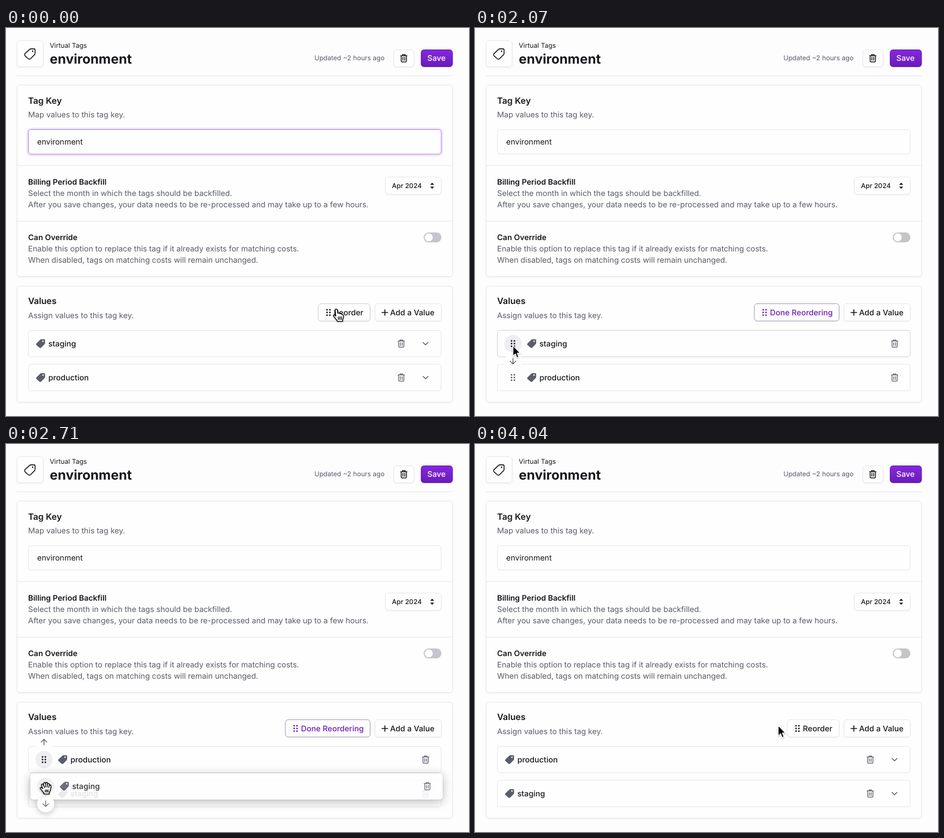
These frames come from a looping animation (817x686 px, 4080 ms). An HTML page:

```html
<!DOCTYPE html>
<html lang="en">
<head>
<meta charset="utf-8">
<title>Virtual Tags</title>
<style>
html, body { margin: 0; width: 100%; height: 100%; overflow: hidden; background: #fdfdfe; }
svg { display: block; width: 817px; height: 686px; font: 400 13.65px Inter, sans-serif; text-rendering: geometricPrecision; }
text { fill: #17171c; white-space: pre; }
.mute { fill: #585b68; }
.mid { font-weight: 500; font-size: 13.75px; }
.small { font-size: 11.7px; }
.bold { font-weight: 600; }
.h1 { font-size: 23.4px; font-weight: 700; }
.h2 { font-size: 15.4px; font-weight: 600; }
.box { fill: #fefefe; stroke: #e6e6ea; }
.card { filter: drop-shadow(0 1px 1px rgba(0,0,0,.06)); }
.rule { stroke: #e6e6ea; }
.line { fill: none; stroke-linecap: round; stroke-linejoin: round; }
.ink { stroke: #17171c; }
.gray { stroke: #5a5d6a; }
.lift { filter: drop-shadow(0 0 1px rgba(0,0,0,.28)) drop-shadow(0 4px 9px rgba(0,0,0,.3)); }
.knob { filter: drop-shadow(0 4px 5px rgba(0,0,0,.22)); }
.cursor { filter: drop-shadow(0 1px 1px rgba(0,0,0,.3)); }
</style>
</head>
<body>
<svg viewBox="0 0 817 686">
  <defs>
    <linearGradient id="violet" x2="0" y2="1">
      <stop stop-color="#8428dc"/><stop offset="1" stop-color="#691bb9"/>
    </linearGradient>
    <path id="tag" d="M1.6-7.7H6.4Q7.9-7.7 7.9-6.2V-1Q7.9 .1 7.1.9L.9 7.2Q-.6 8.5-2 7.2L-7.4 2.4Q-8.5 1.1-7.4-.3L-.4-6.9Q.5-7.7 1.6-7.7Z"/>
    <path id="trash" d="M-5.6-4.6H5.6M-2.3-4.6V-6.4H2.3V-4.6M-4.6-4.6V5Q-4.6 6.4-3.2 6.4H3.2Q4.6 6.4 4.6 5V-4.6M-1.6-1.8V3.6M1.6-1.8V3.6"/>
    <path id="dots" d="M-2.5-4.7v0M2.5-4.7v0M-2.5 0v0M2.5 0v0M-2.5 4.7v0M2.5 4.7v0" stroke-width="2.9" stroke-linecap="round"/>
    <path id="arrow" d="M0-5V5M-5 0L0 5L5 0"/>
  </defs>

  <rect class="box card" x="19.5" y="22.5" width="46" height="46" rx="5"/>
  <use href="#tag" class="line ink" stroke-width="1.35" transform="translate(42 46) scale(1.18)"/>
  <circle cx="47" cy="41" r="1.2"/>
  <text class="small" x="77.3" y="35.2">Virtual Tags</text>
  <text class="h1" x="77.3" y="63">environment</text>
  <text class="small mute" x="544.2" y="57.3">Updated ~2 hours ago</text>
  <rect class="box card" x="684.5" y="38.5" width="35.5" height="30" rx="5"/>
  <use href="#trash" class="line ink" stroke-width="1.5" x="702" y="53.5"/>
  <rect class="card" x="732.5" y="38.5" width="55.5" height="30" rx="5" fill="url(#violet)" stroke="#6a1cb8"/>
  <text class="mid" x="743.6" y="58" style="fill:#fff">Save</text>
  <path class="rule" d="M19 84.5H788.5"/>

  <rect class="box card" x="19.5" y="101" width="768.5" height="338.5" rx="5"/>
  <text class="h2" x="39" y="133.8">Tag Key</text>
  <text class="mute" x="39" y="158.4">Map values to this tag key.</text>
  <rect id="ring" x="37.5" y="178" width="732" height="47" rx="6.5" fill="none" stroke="#efe3fd" stroke-width="3"/>
  <rect id="field" class="box" x="39.5" y="179.5" width="728.5" height="43.5" rx="5"/>
  <text x="55" y="206">environment</text>
  <path id="caret" class="ink" d="M56 193V209"/>
  <path class="rule" d="M20 243.5H788M20 341.5H788"/>
  <text class="bold" x="39" y="277.2">Billing Period Backfill</text>
  <text class="mute" x="39" y="297">Select the month in which the tags should be backfilled.</text>
  <text class="mute" x="39" y="316.5">After you save changes, your data needs to be re-processed and may take up to a few hours.</text>
  <rect class="box card" x="669.5" y="263.5" width="98.5" height="30.5" rx="5"/>
  <text class="mid small" x="681" y="283">Apr 2024</text>
  <path d="M748.4 277.2L752 273.6L755.6 277.2ZM748.4 280.6L752 284.2L755.6 280.6Z" fill="#17171c"/>
  <text class="bold" x="39" y="375.3">Can Override</text>
  <text class="mute" x="39" y="395">Enable this option to replace this tag if it already exists for matching costs.</text>
  <text class="mute" x="39" y="414.5">When disabled, tags on matching costs will remain unchanged.</text>
  <rect x="737" y="361.5" width="31.2" height="17.5" rx="8.75" fill="#c4c4cb"/>
  <circle cx="746" cy="370.2" r="7" fill="#fff"/>

  <rect class="box card" x="19.5" y="456.5" width="768.5" height="205" rx="5"/>
  <text class="h2" x="39" y="488.1">Values</text>
  <text class="mute" x="39" y="513.2">Assign values to this tag key.</text>
  <rect id="mode" class="box card" y="487.5" height="30.5" rx="5"/>
  <use id="modeDots" href="#dots" y="503"/>
  <text id="modeText" class="mid" y="507.5"></text>
  <rect class="box card" x="651" y="487.5" width="117" height="30.5" rx="5"/>
  <path class="line ink" stroke-width="1.7" d="M663.5 503H673.5M668.5 498V508"/>
  <text class="mid" x="677.7" y="507.5">Add a Value</text>

  <g id="rows"></g>

  <g id="cursor" class="cursor" stroke-linejoin="round">
    <path id="pointer" d="M0 0V18.6L4.2 14.6L7.2 21.4L10.2 20.1L7.3 13.5H13Z" stroke="#fff" stroke-width="1.3"/>
    <g id="hand" fill="#fff" stroke="#000" stroke-width="1.4" transform="translate(-1 -.6)">
      <path d="M-3.6 2Q-3.6-.5-1.7-.5Q.2-.5.4 2L1 7Q2.6 5.6 4 6.8L4.5 7.7Q6.4 6.6 7.6 8.2L8 9.2Q10.6 8.6 11 11.2Q11.4 15.6 9.5 18.2V21.2H.2Q-.8 18.6-2.8 16.6Q-5.4 13.6-6.7 11.4Q-6.8 9-4.7 9.8L-2.6 12Z"/>
      <path class="line" d="M2 13V18M4.8 13V18M7.5 13V18"/>
    </g>
    <g id="palm" fill="#fff" stroke="#000" stroke-width="1.4">
      <path d="M-5 1L-7.4-5Q-7.6-7.6-5.7-7.4Q-4.6-7.2-3.6-4.4L-3.5-8.4Q-3-10.4-1.4-10Q-.3-9.6-.2-7.4L.4-9.6Q1.7-11 3.1-9.4L3.3-6.4Q4.4-9 6-8Q7-7.2 6.4-4.6Q7.6-6.6 9.2-5Q9.8-2 8.6 1.4Q8.4 4.6 6.4 7.4V10.4H-3V8.6Q-5.4 6.4-7 3.6L-9.6.6Q-9.6-2-7.4-1.2Z"/>
      <path class="line" d="M-3-4L-2-1M0-7V-2M3.3-6.4L2.8-2M6.4-4.6L5.4-1M-.6 3V7M1.8 3V7M4.2 3V7"/>
    </g>
  </g>
</svg>
<script>
const LOOP = 4080;
const OPEN = 610, CLOSE = 3680, GRAB = 2210, SWAP = 2350, DROP = 2750, LANDED = 3000;
const ROW_TOP = 558, ROW_STEP = 60;

const $ = id => document.getElementById(id);
const set = (el, attrs) => { for (const k in attrs) el.setAttribute(k, attrs[k]); };
const show = (el, on) => set(el, { opacity: +on });
const clamp = v => Math.min(1, Math.max(0, v));
const ramp = (t, from, ms) => clamp((t - from) / ms);
const mix = (a, b, k) => a + (b - a) * k;
const blend = (a, b, k) => `rgb(${a.map((v, i) => Math.round(mix(v, b[i], k)))})`;
const linear = k => k;
const easeOut = k => 1 - (1 - k) ** 2;
const easeInOut = k => k < .5 ? 4 * k ** 3 : 1 - 4 * (1 - k) ** 3;

// time, x, y, easing into the stop
const path = [
  [0, 585.5, 498, linear],
  [850, 585.5, 498, linear],
  [1776, 67, 561.5, easeInOut],
  [GRAB, 67, 561.5, linear],
  [2320, 67, 587, linear],
  [2700, 70, 608.5, easeOut],
  [3140, 70, 608.5, linear],
  [3430, 535, 497.5, easeInOut],
  [LOOP, 535, 497.5, linear]
];

function cursorAt(t) {
  const i = path.findIndex(p => p[0] > t);
  const [t0, x0, y0] = path[i - 1], [t1, x1, y1, ease] = path[i];
  const k = ease((t - t0) / (t1 - t0));
  return [mix(x0, x1, k), mix(y0, y1, k)];
}

const nudge = (dir, cls) => `
  <g data-part="${dir < 0 ? 'up' : 'down'}" transform="translate(67 ${dir * 31})">
    <circle class="${cls}" r="15.2" fill="#fefefe"/>
  </g>`;
const tip = dir => `
  <use data-part="${dir < 0 ? 'upTip' : 'downTip'}" href="#arrow" class="line gray" stroke-width="1.4"
    transform="translate(67 ${dir * 31}) scale(1 ${dir})"/>`;

function makeRow(name, floating) {
  const g = document.createElementNS('http://www.w3.org/2000/svg', 'g');
  const frame = floating
    ? `<rect class="lift" data-part="shade" x="40" y="-23" width="727.5" height="46.5" rx="5" fill="#fefefe"/>${nudge(1, 'knob')}
       <rect x="40" y="-23" width="727.5" height="46.5" rx="5" fill="#fefefe"/>`
    : `<rect class="box" data-part="frame" x="39.5" y="-23.5" width="728.5" height="47" rx="5"/>${nudge(-1, '')}${nudge(1, '')}`;
  g.innerHTML = frame + `
    <g data-part="grip">
      <circle data-part="disc" cx="67" r="15.3" fill="#eeeef2"/>
      ${tip(-1)}${tip(1)}
      <use data-part="dots" href="#dots" x="67"/>
    </g>
    <g data-part="label">
      <use href="#tag" x="61" fill="#5a5d6a"/>
      <circle cx="65.2" cy="-4.3" r="1.3" fill="#fefefe"/>
      <text class="mid" x="74.7" y="4.9">${name}</text>
    </g>
    <use data-part="bin" href="#trash" class="line gray" stroke-width="1.3"/>
    <path data-part="chevron" class="line gray" stroke-width="1.5" d="M736-2L740.3 2.3L744.6-2"/>`;
  $('rows').append(g);
  const row = { g };
  g.querySelectorAll('[data-part]').forEach(el => row[el.dataset.part] = el);
  return row;
}

const production = makeRow('production');
const staging = makeRow('staging');
const floater = makeRow('staging', true);

function drawRow(row, { x = 0, y, edit, hover = 0, up = 0, down = 0, edge = 0 }) {
  set(row.g, { transform: `translate(${x} ${y})` });
  set(row.label, { transform: `translate(${edit ? 39 : 0})` });
  set(row.bin, { x: edit ? 740.5 : 697.5 });
  show(row.chevron, !edit);
  show(row.grip, edit);
  set(row.disc, { opacity: hover });
  set(row.dots, { stroke: blend([98, 100, 112], [23, 23, 28], hover) });
  for (const [name, value] of [['up', up], ['down', down]]) {
    if (row[name]) set(row[name], { opacity: value });
    set(row[name + 'Tip'], { opacity: value });
  }
  if (row.frame) row.frame.style.stroke = blend([230, 230, 234], [208, 208, 215], edge);
}

function drawMode(t, edit) {
  const left = edit ? 493 : 551;
  const tint = edit ? ramp(t, 780, 150) : 0;
  const over = edit ? ramp(t, 3400, 150) : 0;
  const ink = blend([23, 23, 28], [107, 31, 181], tint);
  const hot = t < OPEN || edit ? 1 : 1 - ramp(t, CLOSE, 150);
  const mode = $('mode');
  set(mode, { x: left, width: 642.5 - left });
  mode.style.fill = blend([254, 254, 254], [246, 243, 251], over);
  mode.style.stroke = edit
    ? blend([205, 205, 212], [165, 148, 190], tint)
    : blend([230, 230, 234], [205, 205, 212], hot);
  set($('modeDots'), { x: left + 18, stroke: ink });
  set($('modeText'), { x: left + 27.6 });
  $('modeText').style.fill = ink;
  $('modeText').textContent = edit ? 'Done Reordering' : 'Reorder';
}

function drawCursor(t, x, y, edit) {
  const onMode = x > (edit ? 493 : 551) && y < 519;
  const palm = t > 2420 && t < 3150;
  set($('cursor'), { transform: `translate(${x} ${y})` });
  show($('palm'), palm);
  show($('hand'), onMode && !palm);
  show($('pointer'), !onMode && !palm);
}

function draw(t) {
  const edit = t >= OPEN && t < CLOSE;
  const [x, y] = cursorAt(t);

  const focus = 1 - ramp(t, OPEN, 120);
  set($('ring'), { opacity: focus });
  $('field').style.stroke = blend([230, 230, 234], [174, 122, 230], focus);
  show($('caret'), t >= 460 && t < OPEN);

  const swap = easeOut(ramp(t, SWAP, 200));
  const hoverIn = ramp(t, 1680, 150);
  const hoverOut = 1 - ramp(t, 3150, 130);
  const passing = ramp(t, SWAP + 30, 150) * (1 - ramp(t, DROP, 150));

  drawRow(production, {
    y: ROW_TOP + ROW_STEP * (1 - swap), edit,
    hover: passing, up: passing
  });
  drawRow(staging, {
    y: ROW_TOP + ROW_STEP * swap, edit,
    hover: hoverIn * hoverOut,
    up: t >= LANDED ? hoverOut : 0,
    down: t < SWAP ? hoverIn : 0,
    edge: ramp(t, 1430, 120) * (1 - ramp(t, GRAB, 100))
  });

  // the dragged copy is slightly see-through until it lands
  const fall = easeOut(ramp(t, DROP, LANDED - DROP));
  const lifted = t >= GRAB && t < LANDED;
  set(floater.g, { opacity: lifted ? mix(.88, 1, fall) : 0 });
  set(floater.shade, { opacity: ramp(t, GRAB, 80) * (1 - fall) });
  drawRow(floater, {
    x: t < DROP ? x - 67 : 3 * (1 - fall),
    y: t < DROP ? ROW_TOP + y - 561.5 : mix(ROW_TOP + 47, ROW_TOP + ROW_STEP, fall),
    edit: true, hover: 1, down: 1 - fall
  });

  drawMode(t, edit);
  drawCursor(t, x, y, edit);
}

const start = performance.now();
function tick() {
  draw((performance.now() - start) % LOOP);
  requestAnimationFrame(tick);
}
draw(0);
requestAnimationFrame(tick);
</script>
</body>
</html>
```
